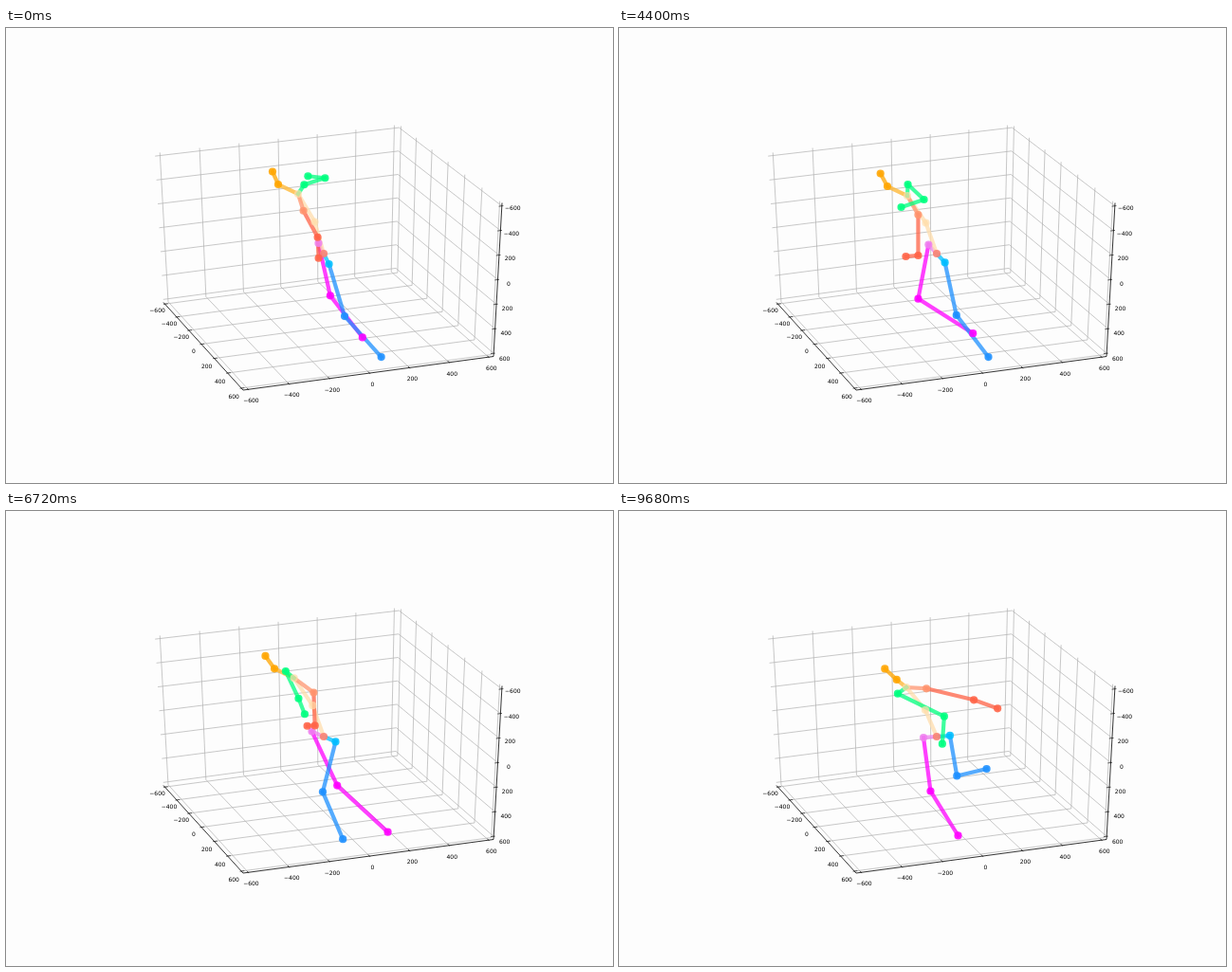
Recreate the animation shown at these times as an HTML page. Size 640 by 480 pixels, loop 9.72 s.

```html
<!DOCTYPE html>
<html>
<head>
<meta charset="utf-8">
<style>
  html, body { margin: 0; width: 100%; height: 100%; overflow: hidden; background: #fdfdfd; }
  svg { display: block; }
  text { font: 6px "DejaVu Sans", sans-serif; text-anchor: middle; dominant-baseline: central; }
</style>
</head>
<body>
<svg id="stage" width="640" height="480" viewBox="0 0 640 480"></svg>
<script>
const LOOP = 9720, STEP = 40;
const stage = document.getElementById('stage');

function add(tag, attrs, label) {
  const node = document.createElementNS('http://www.w3.org/2000/svg', tag);
  for (const key in attrs) node.setAttribute(key, attrs[key]);
  if (label !== undefined) node.textContent = label;
  return stage.appendChild(node);
}
const clamp = u => Math.min(1, Math.max(0, u));
const mix = (a, b, f) => a.map((v, k) => v + (b[k] - v) * f);
const plus = (a, b, scale = 1) => a.map((v, k) => v + b[k] * scale);
const ellipse = (rx, ry, angle) => [rx * Math.cos(angle), ry * Math.sin(angle)];
const line = (a, b, stroke, width) =>
  add('line', { x1: a[0], y1: a[1], x2: b[0], y2: b[1], stroke, 'stroke-width': width });

// ---- Plot box ----
const left = [166, 289.5], front = [250, 382], right = [514, 346.5], back = [411, 256.5];
const topLeft = [157, 132], topBack = [414.5, 102], topRight = [523, 184.5];

const perspective = (f, w) => f / (f + (1 - f) * w);
function ticks(drawTick) {
  for (let i = 0; i < 7; i++) {
    const f = (1 + 8 * i) / 50;
    drawTick(perspective(f, 1.1), perspective(f, 0.98), f, i);
  }
}
const grid = (a, b, c, d, f) => line(mix(a, b, f), mix(c, d, f), '#b0b0b0', 0.7);
function mark(p, dir, label, offset) {
  line(plus(p, dir, -1), plus(p, dir, 2), '#000', 0.6);
  const [x, y] = plus(p, offset);
  add('text', { x, y }, label);
}

ticks((fx, fy, fz) => {
  grid(left, front, back, right, fx);
  grid(topBack, topRight, back, right, fx);
  grid(left, back, front, right, fy);
  grid(topLeft, topBack, left, back, fy);
  grid(topLeft, left, topBack, back, fz);
  grid(topBack, back, topRight, right, fz);
});
for (const [a, b] of [[left, front], [front, right], [topRight, right]]) line(a, b, '#000', 0.8);
ticks((fx, fy, fz, i) => {
  const label = String(i * 200 - 600).replace('-', '−');
  mark(mix(left, front, fx), [1.6, -0.2], label, [-8, 6 + 3 * fx]);
  mark(mix(front, right, fy), [-0.7, -0.77], label, [3, 11.3]);
  mark(mix(topRight, right, fz), [-1.6, 0.2], i === 2 ? '200' : label, [11.5, 2 + 3 * fz]);
});

// ---- Motion ----
// Smooth curve through points; u counts points
function spline(points, u, closed) {
  const n = points.length, i = Math.min(Math.floor(u), closed ? Infinity : n - 2), f = u - i;
  const at = j => points[closed ? (j % n + n) % n : Math.min(n - 1, Math.max(0, j))];
  const [a, b, c, d] = [at(i - 1), at(i), at(i + 1), at(i + 2)];
  return b.map((v, k) => v + f / 2 * (c[k] - a[k] +
    f * (2 * a[k] - 5 * v + 4 * c[k] - d[k] + f * (3 * (v - c[k]) + d[k] - a[k]))));
}

// One stride relative to the hip: push off, swing, land, stance
const KNEE = [[27, 57], [30, 55], [19, 56], [-12, 57], [-13, 52], [-16, 55], [2, 57], [16, 55]];
const ANKLE = [[81, 106], [97, 88], [90, 63], [44, 95], [-2, 105], [-8, 112], [26, 107], [54, 98]];
const WAKE = 1520, WALK = 3040, STRIDE = 3700;

function stridePhase(t, rest, start) {
  return t < WALK
    ? rest + (start - rest) * clamp((t - WAKE) / (WALK - WAKE))
    : start + (t - WALK) / STRIDE;
}
function leg(hip, phase, lift) {
  const raise = lift * Math.max(0, Math.sin(2 * Math.PI * phase));
  const joint = (path, shift) => plus(plus(hip, spline(path, phase * 8, true)), shift, -raise);
  return [hip, joint(KNEE, [9, 14]), joint(ANKLE, [49, 30])];
}

// Trunk and arm key poses; each arm segment is relative to its parent joint
const POSES = [0, 1520, 3040, 4400, 6000, 7560, 9680];
const NECK = [[308, 175], [305, 176], [300, 175], [304, 177], [300, 175], [308, 179], [303, 186]];
const GREEN_ARM = [
  [[22, -7], [23, -3], [31, 15], [17, 16], [2, 35], [32, 19], [49, 24]],
  [[-18, -2], [-24, 1], [-26, 13], [-24, 8], [2, 3], [7, 33], [-2, 29]]];
const RED_ARM = [
  [[15, 28], [18, 32], [30, 39], [0, 43], [-4, 41], [13, 26], [50, 12]],
  [[1, 22], [2, 28], [11, 16], [-13, 1], [-18, -6], [7, 9], [25, 9]]];

function arm(shoulder, [upper, fore], pose) {
  const elbow = plus(shoulder, spline(upper, pose));
  return [shoulder, elbow, plus(elbow, spline(fore, pose))];
}

// All joints as chains, each beginning at its parent joint
function skeleton(t) {
  const i = Math.max(0, POSES.findIndex(end => t <= end) - 1);
  const pose = i + (t - POSES[i]) / (POSES[i + 1] - POSES[i]);
  const turn = clamp((t - WALK) / (LOOP - WALK));
  const late = clamp((t - 6000) / (LOOP - 6000)) ** 2;

  const pelvis = [335, 238], neck = spline(NECK, pose);
  const spine = plus(mix(pelvis, neck, 0.5), [4, -2]);
  const nose = plus(neck, [-21 + 11 * late, -10 + 2 * late]);
  const head = plus(nose, [-6 - 6.5 * turn, -13.5 + 2 * late]);

  const facing = -0.95 - 2.8 * turn;
  const across = ellipse(11, 12, facing);
  const hips = ellipse(14, 12, 0.45 * facing - 1.55);
  return [
    [pelvis, ...leg(plus(pelvis, hips), stridePhase(t, 0.84, 1), late)],
    [pelvis, ...leg(plus(pelvis, hips, -1), stridePhase(t, 0.88, 1.47), late)],
    [pelvis, spine, neck],
    [neck, nose, head],
    [neck, ...arm(plus(plus(neck, [12, 8]), across, -1), RED_ARM, pose)],
    [neck, ...arm(plus(neck, across), GREEN_ARM, pose)],
  ];
}

// ---- Drawing ----
const WHEAT = '#ffdead', ORANGE = '#ffa500', GREEN = '#00ff7f', TOMATO = '#ff6347';
const PINK = '#ff00ff', BLUE = '#1e90ff', SKY = '#00bfff';
const COLORS = [
  ['#ee82ee', PINK, PINK],
  [SKY, BLUE, BLUE],
  [WHEAT, WHEAT],
  ['#ffb52e', ORANGE],
  ['#ff9670', TOMATO, TOMATO],
  [GREEN, GREEN, GREEN],
];
const bones = COLORS.map(chain => chain.map(stroke =>
  add('line', { stroke, 'stroke-width': 4.2, 'stroke-linecap': 'square', opacity: 0.75 })));
const dot = fill => add('circle', { r: 4.1, fill, opacity: fill === WHEAT ? 0.7 : 0.88 });
const pelvisDot = dot('#fa8072');
const dots = COLORS.map(chain => chain.map((fill, i) => dot(fill === '#ffb52e' ? ORANGE : fill)));

function place(node, names, point) {
  names.forEach((name, k) => node.setAttribute(name, point[k]));
}
function draw(elapsed) {
  const t = Math.floor(elapsed % LOOP / STEP) * STEP;
  const chains = skeleton(t);
  place(pelvisDot, ['cx', 'cy'], chains[0][0]);
  chains.forEach((joints, c) => bones[c].forEach((bone, i) => {
    place(bone, ['x1', 'y1'], joints[i]);
    place(bone, ['x2', 'y2'], joints[i + 1]);
    place(dots[c][i], ['cx', 'cy'], joints[i + 1]);
  }));
}

let begin;
function animate(now) {
  begin ??= now;
  draw(now - begin);
  requestAnimationFrame(animate);
}
draw(0);
requestAnimationFrame(animate);
</script>
</body>
</html>
```
